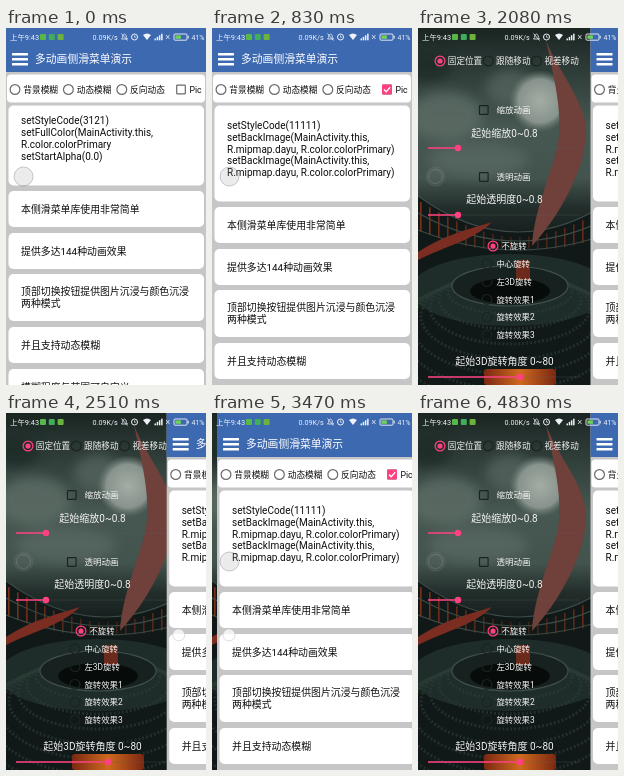
Write an HTML page that moves like this. It is 200 px wide and 357 px high and loops after 5.46 s.

```html
<!DOCTYPE html>
<html lang="zh-CN">
<head>
<meta charset="utf-8">
<title>侧滑菜单演示</title>
<style>
html, body { margin: 0; width: 100%; height: 100%; overflow: hidden; background: #0b100f; }
svg { display: block; width: 100vw; height: 100vh; }
text { font-family: Roboto, "Noto Sans CJK SC", "Noto Sans CJK JP", "Noto Sans CJK", sans-serif; white-space: pre; }
</style>
</head>
<body>
<svg id="stage" viewBox="0 0 200 357" preserveAspectRatio="none">
  <defs>
    <linearGradient id="sky" x2="0" y2="1">
      <stop offset="0" stop-color="#1a2522"/>
      <stop offset=".12" stop-color="#2f3d39"/>
      <stop offset=".28" stop-color="#475751"/>
      <stop offset=".42" stop-color="#43534d"/>
      <stop offset=".5" stop-color="#232f2c"/>
      <stop offset=".6" stop-color="#111918"/>
      <stop offset="1" stop-color="#0c1312"/>
    </linearGradient>
    <radialGradient id="moon">
      <stop offset="0" stop-color="#a3ada6"/>
      <stop offset=".7" stop-color="#87938c"/>
      <stop offset="1" stop-color="#6c7a73" stop-opacity="0"/>
    </radialGradient>
    <linearGradient id="glow">
      <stop offset="0" stop-color="#7a2812"/>
      <stop offset=".5" stop-color="#d0691f"/>
      <stop offset="1" stop-color="#7a2812"/>
    </linearGradient>
    <filter id="soft"><feGaussianBlur stdDeviation="6"/></filter>
  </defs>
  <g id="scene"></g>
  <g id="menu"></g>
  <g id="panel"></g>
  <g id="status"></g>
  <g id="ball"></g>
  <circle id="touch" r="6" fill="#fff" fill-opacity=".75" stroke="#c4c4c4" stroke-opacity=".7" stroke-width=".8"/>
</svg>
<script>
const NS = 'http://www.w3.org/2000/svg';
const $ = id => document.getElementById(id);
const PINK = '#ff4081', BLUE = '#3d69b1', INK = '#0c0c0c';
const LOOP = 5460;

function add(parent, tag, attrs, text) {
  const el = document.createElementNS(NS, tag);
  for (const k in attrs) el.setAttribute(k, attrs[k]);
  if (text !== undefined) el.textContent = text;
  parent.appendChild(el);
  return el;
}
// y is the visual middle of the line
const label = (p, x, y, text, size, fill, anchor = 'start') =>
  add(p, 'text', { x, y: y + size * .37, 'font-size': size, fill, 'text-anchor': anchor }, text);
const box = (p, x, y, width, height, fill, rx = 0) =>
  add(p, 'rect', { x, y, width, height, fill, rx });
const path = (p, d, stroke, width, fill = 'none') =>
  add(p, 'path', { d, stroke, 'stroke-width': width, fill });
const dot = (p, cx, cy, r, fill) => add(p, 'circle', { cx, cy, r, fill });
const oval = (p, cx, cy, rx, ry, fill, more) =>
  add(p, 'ellipse', { cx, cy, rx, ry, fill, ...more });

function radio(p, x, y, color, on) {
  add(p, 'circle', { cx: x, cy: y, r: 4.9, fill: 'none', stroke: color, 'stroke-width': 1.2 });
  if (on) dot(p, x, y, 2.6, color);
}
function checkbox(p, x, y, color) {
  add(p, 'rect', { x: x - 4.3, y: y - 4.3, width: 8.6, height: 8.6, rx: .6, fill: 'none', stroke: color, 'stroke-width': 1.2 });
}

function buildScene(g) {
  box(g, 0, 0, 200, 357, 'url(#sky)');
  const haze = add(g, 'g', { filter: 'url(#soft)', opacity: .8 });
  oval(haze, 28, 88, 36, 24, '#5d6d66');
  oval(haze, 60, 132, 50, 17, '#586862');
  oval(haze, 92, 60, 24, 18, '#55645e');
  oval(haze, 10, 38, 24, 16, '#1d2926');
  dot(g, 122, 73, 31, 'url(#moon)');

  // railing with lamp posts, sagging towards the middle
  const sag = x => 168 + 36 * Math.sin(Math.PI * x / 200);
  path(g, 'M0 168Q100 240 200 168V357H0Z', 'none', 0, '#111918');
  for (let x = 2; x < 200; x += 9) {
    const side = Math.abs(x - 100) / 100;
    box(g, x, sag(x) + 5, 1.6, 10 + 20 * side, '#8c3419').setAttribute('opacity', .3 + .6 * side);
  }
  for (let i = 0; i < 3; i++) {
    const y = 168 + i * 17;
    path(g, `M0 ${y}Q100 ${y + 72 - i * 16} 200 ${y}`, '#3c4a45', 1.1);
  }

  // stage and seat rows
  oval(g, 92, 262, 100, 36, '#1f2d2a');
  for (let i = 0; i < 9; i++) {
    oval(g, 92, 264 + i * 8, 62 + i * 9, 22 + i * 7, 'none',
      { stroke: '#2c3c38', 'stroke-width': 3, 'stroke-dasharray': '2 2', opacity: .6 });
  }
  oval(g, 92, 258, 58, 20, '#17211f', { stroke: '#40504b', 'stroke-width': 1.2 });
  oval(g, 92, 263, 40, 13, '#070c0b');
  box(g, 98, 232, 14, 20, '#6b2a1c', 3);
  box(g, 66, 341, 72, 16, 'url(#glow)', 3);

  path(g, 'M128 12C140 44 166 70 168 102C168 142 140 190 114 218C116 182 132 150 140 116C145 84 136 50 128 12Z', 'none', 0, '#70403a');
  path(g, 'M0 224C24 208 48 202 74 194C56 212 28 218 0 232Z', 'none', 0, '#7c2d22');
}

function slider(g, y, x) {
  path(g, `M10 ${y}H162`, '#59635e', .8).setAttribute('opacity', .35);
  path(g, `M10 ${y}H${x}`, PINK, 1.5);
  dot(g, x, y, 3.2, PINK);
}

function buildMenu(g) {
  const dim = '#1b2421', white = '#f4f4f4';
  ['固定位置', '跟随移动', '视差移动'].forEach((s, i) => {
    radio(g, 22 + i * 48.3, 33, i ? dim : PINK, !i);
    label(g, 29.8 + i * 48.3, 33, s, 8.6, white);
  });
  [['缩放动画', 82, '起始缩放0~0.8', 105, 120], ['透明动画', 149, '起始透明度0~0.8', 171, 187]]
    .forEach(([name, y, range, ry, sy]) => {
      checkbox(g, 65.8, y, dim);
      label(g, 78.5, y, name, 8.5, white);
      label(g, 86.5, ry, range, 10, white, 'middle');
      slider(g, sy, 40);
    });
  ['不旋转', '中心旋转', '左3D旋转', '旋转效果1', '旋转效果2', '旋转效果3'].forEach((s, i) => {
    const y = 218 + i * 17.8;
    radio(g, i ? 69 : 75, y, i ? dim : PINK, !i);
    label(g, i ? 78.5 : 83.5, y, s, 8.4, white);
  });
  label(g, 86.5, 333, '起始3D旋转角度 0~80', 10, white, 'middle');
  slider(g, 349, 102);
}

function card(g, y, h, lines) {
  box(g, 2.5, y, 195.5, h, '#fff', 5);
  lines.forEach((s, i) => label(g, 15, y + h / 2 + (i - (lines.length - 1) / 2) * 12.6, s, 9.9, INK));
}
function code(g, h, first, lines) {
  box(g, 2.5, 77.5, 195.5, h, '#fff', 5);
  lines.forEach((s, i) => label(g, 15, first + i * 11.9, s, 10, INK));
}

const ui = {};
function buildPanel(g) {
  box(g, 0, 0, 200, 357, '#c6c6c6');
  box(g, 0, 0, 200, 44, BLUE);
  for (let i = 0; i < 3; i++) box(g, 6, 25 + i * 5, 16, 2.4, '#fff', .5);
  label(g, 29, 31, '多动画侧滑菜单演示', 10.8, '#fff');
  box(g, 1, 46.5, 198, 28, '#fff', 4);
  ['背景模糊', '动态模糊', '反向动态'].forEach((s, i) => {
    radio(g, 9 + i * 53.4, 61.5, '#6a6a6a', false);
    label(g, 17.3 + i * 53.4, 61.5, s, 8.7, INK);
  });
  checkbox(g, 175, 61.5, '#6a6a6a');
  label(g, 183.5, 61.5, 'Pic', 8.7, INK);
  ui.tick = add(g, 'g', {});
  box(ui.tick, 170, 56.5, 10, 10, PINK, 1);
  path(ui.tick, 'M172 61.5L174.2 63.8L178.2 59.3', '#fff', 1.3);

  ui.color = add(g, 'g', {});
  code(ui.color, 80, 92.5, ['setStyleCode(3121)', 'setFullColor(MainActivity.this,', 'R.color.colorPrimary', 'setStartAlpha(0.0)']);
  ui.pic = add(g, 'g', {});
  const back = ['setBackImage(MainActivity.this,', 'R.mipmap.dayu, R.color.colorPrimary)'];
  code(ui.pic, 96, 97, ['setStyleCode(11111)', ...back, ...back]);

  ui.list = add(g, 'g', {});
  card(ui.list, 163, 36, ['本侧滑菜单库使用非常简单']);
  card(ui.list, 205, 36, ['提供多达144种动画效果']);
  card(ui.list, 246, 47, ['顶部切换按钮提供图片沉浸与颜色沉浸', '两种模式']);
  card(ui.list, 299, 36, ['并且支持动态模糊']);
  card(ui.list, 341, 36, ['模糊程度与范围可自定义']);
}

function buildStatus(g) {
  const w = '#eef2f8';
  label(g, 4, 9, '上午9:43', 7.4, w);
  ['#54b948', '#3fae5a', '#6cb33e'].forEach((c, i) => box(g, 34 + i * 8.8, 6, 6, 6, c, 1));
  ui.speed = label(g, 86.5, 9, '0.09K/s', 7.2, w);
  path(g, 'M115.5 11H121.5L120.3 9.5V7.5Q118.5 4.5 116.7 7.5V9.5ZM115.5 5.5L121.5 12.5', w, .8);
  add(g, 'circle', { cx: 128.5, cy: 9, r: 3, fill: 'none', stroke: w, 'stroke-width': 1 });
  path(g, 'M128.5 7.3V9.2H130', w, .7);
  path(g, 'M137 7Q141 3.8 145 7L141 12Z', 'none', 0, w);
  for (let i = 0; i < 4; i++) box(g, 148.5 + i * 2.2, 10.5 - i * 1.6, 1.5, 1.8 + i * 1.6, w);
  path(g, 'M160 7L163.5 11M163.5 7L160 11', w, .8);
  add(g, 'rect', { x: 168, y: 6, width: 13, height: 6.2, rx: 1, fill: 'none', stroke: w, 'stroke-width': .9 });
  box(g, 169.4, 7.4, 5.5, 3.4, '#6fd05a');
  box(g, 181.7, 7.8, 1, 2.6, w);
  label(g, 185.5, 9, '41%', 7, w);
}

function buildBall(g) {
  add(g, 'circle', { cx: 17.5, cy: 148.5, r: 9.5, fill: '#808080', 'fill-opacity': .16, stroke: '#6e7472', 'stroke-opacity': .4, 'stroke-width': .9 });
  add(g, 'circle', { cx: 17.5, cy: 148.5, r: 7, fill: 'none', stroke: '#fff', 'stroke-opacity': .14, 'stroke-width': 1 });
}

const easeIn = u => u * u;
const easeOut = u => Math.sin(u * Math.PI / 2);
const easeBoth = u => (1 - Math.cos(u * Math.PI)) / 2;
// start, end, from, to, easing
const drags = [
  [1390, 2080, 0, 172.5, easeBoth],
  [2230, 2900, 172.5, 105, easeIn],
  [2900, 3470, 105, 5, easeOut],
  [3470, 3980, 5, 121.5, easeIn],
  [3980, 4520, 121.5, 172.5, easeOut]
];
const ticks = [1240, 1390, 1530, 1660, 1810, 1930, 2080, 2230, 2360, 2510, 2630, 2750, 2900, 3050,
  3170, 3320, 3470, 3590, 3740, 3860, 3980, 4130, 4280, 4400, 4520];

function offset(t) {
  let x = 0;
  for (const [a, b, from, to, ease] of drags)
    if (t >= a) x = from + (to - from) * ease(Math.min(1, (t - a) / (b - a)));
  return x;
}
const show = (el, on) => el.setAttribute('visibility', on ? 'visible' : 'hidden');

function draw(ms) {
  const now = ms % LOOP;
  const t = ticks.reduce((last, k) => k <= now ? k : last, 0);
  const x = offset(t), pic = now >= 410;
  $('panel').setAttribute('transform', `translate(${x.toFixed(2)} 0)`);
  show(ui.tick, pic);
  show(ui.pic, pic);
  show(ui.color, !pic);
  ui.list.setAttribute('transform', `translate(0 ${pic ? 16 : 0})`);
  ui.speed.textContent = now >= 3740 ? '0.00K/s' : '0.09K/s';

  // the finger runs slightly ahead and upwards on the way back
  const lead = Math.max(0, t - 3470) / 510;
  const touch = $('touch');
  show(touch, (t >= 1530 && t < 2080) || (t >= 2360 && t < 4280));
  touch.setAttribute('cx', x + 12 + lead * 8);
  touch.setAttribute('cy', 222 - lead * 12);
}

buildScene($('scene'));
buildMenu($('menu'));
buildPanel($('panel'));
buildStatus($('status'));
buildBall($('ball'));

const start = performance.now();
function loop() {
  draw(performance.now() - start);
  requestAnimationFrame(loop);
}
loop();
</script>
</body>
</html>
```
